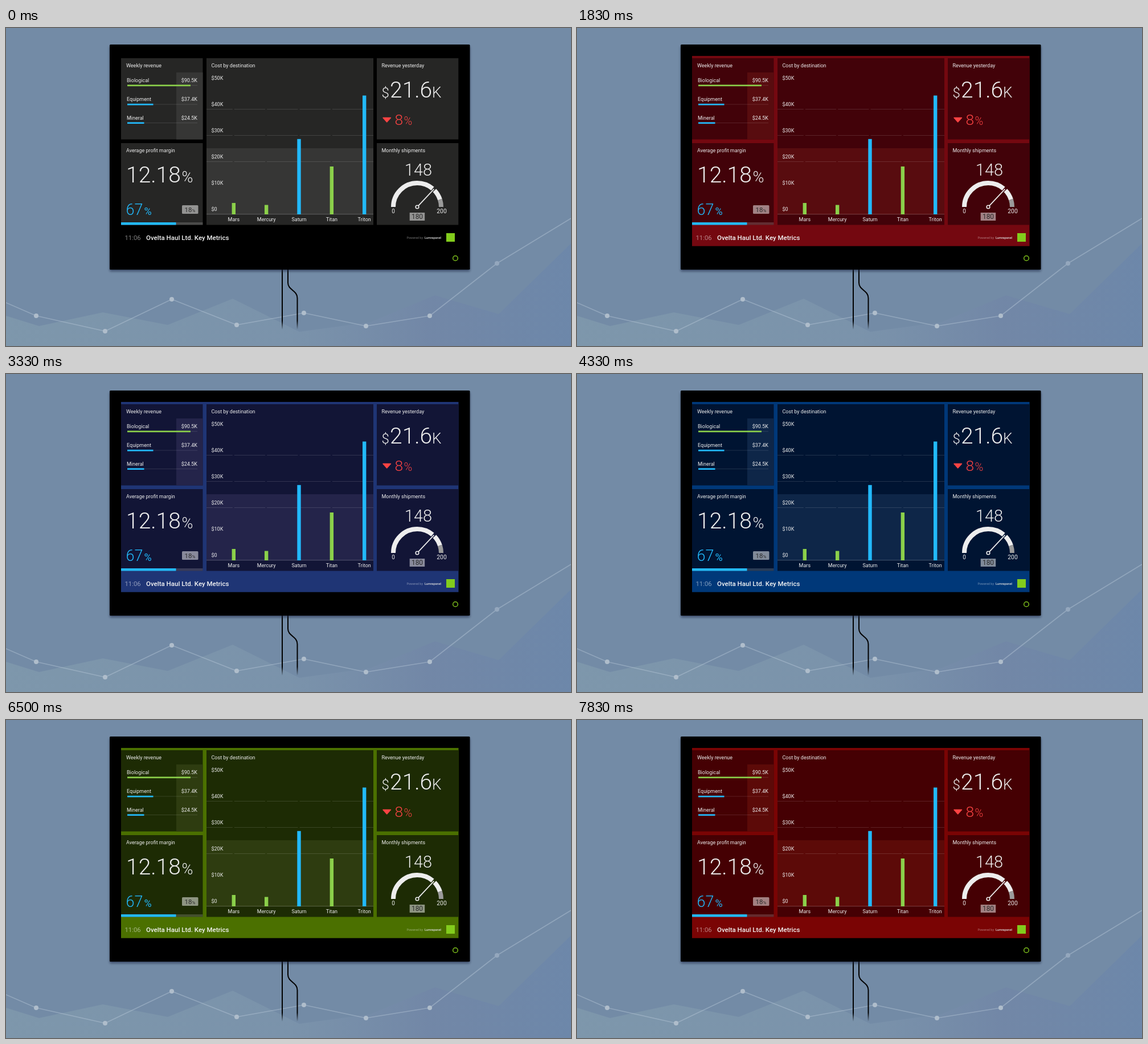
An HTML page with a canvas that plays this animation: 992x558 px, repeating every 8 s.

```html
<!DOCTYPE html>
<html lang="en">
<head>
<meta charset="utf-8">
<title>Wall dashboard</title>
<style>
html, body { margin: 0; width: 100%; height: 100%; overflow: hidden; background: #738ba6; }
canvas { display: block; }
</style>
</head>
<body>
<canvas id="stage" width="992" height="558"></canvas>
<script>
const ctx = document.getElementById('stage').getContext('2d');
const FONT = 'Roboto, Arial, sans-serif';
const LOOP = 8000, FPS = 6, LAST = 47;
const GREEN = '#8bd04a', BLUE = '#22b9fb', RED = '#fa4343', INK = '#ededed';

// Theme colours: screen, tile, highlighted band
const THEMES = {
  black:  ['000000', '262625', '363635'],
  red:    ['7a0404', '450003', '5c0a08'],
  purple: ['3e2878', '24103f', '3a1c50'],
  teal:   ['004272', '001a2c', '0e2c44'],
  blue:   ['00367a', '001333', '0e2549'],
  navy:   ['00297a', '000d38', '0e1c50'],
  green:  ['207000', '0c2b04', '1d3c10'],
  olive:  ['627000', '262b04', '373c10']
};

// Each change: first step, last step, theme reached
const CHANGES = [
  [0, 6, 'red'], [10, 15, 'purple'], [19, 21, 'teal'], [23, 27, 'blue'],
  [30, 31, 'navy'], [32, 35, 'green'], [36, 41, 'olive'], [43, 47, 'red']
];

const rgb = hex => [0, 2, 4].map(i => parseInt(hex.slice(i, i + 2), 16));
const ease = p => p * p * (3 - 2 * p);

function mix(a, b, p) {
  const from = rgb(a), to = rgb(b);
  return `rgb(${from.map((v, i) => Math.round(v + (to[i] - v) * p)).join(',')})`;
}

function themeAt(time) {
  const step = Math.min(LAST, Math.floor((time + 7) * FPS / 1000));
  let from = 'black', to = 'black', p = 0;
  for (const [start, end, name] of CHANGES) {
    if (step < start) break;
    from = to;
    to = name;
    p = ease(Math.min(1, (step - start) / (end - start)));
  }
  return THEMES[from].map((c, i) => mix(c, THEMES[to][i], p));
}

function rect(x1, y1, x2, y2, color) {
  ctx.fillStyle = color;
  ctx.fillRect(x1, y1, x2 - x1, y2 - y1);
}

function text(str, x, y, size, { color = INK, align = 'left', weight = 400 } = {}) {
  ctx.font = `${weight} ${size}px ${FONT}`;
  ctx.textAlign = align;
  ctx.fillStyle = color;
  ctx.fillText(str, x, y);
}

function trace(points) {
  ctx.beginPath();
  points.forEach(([x, y]) => ctx.lineTo(x, y));
}

function stroke(color, width) {
  ctx.strokeStyle = color;
  ctx.lineWidth = width;
  ctx.stroke();
}

function ring(x, y, r, color, width) {
  ctx.beginPath();
  ctx.arc(x, y, r, 0, Math.PI * 2);
  stroke(color, width);
}

function drawWall() {
  rect(0, 0, 992, 558, '#738ba6');
  const hill = ctx.createLinearGradient(0, 0, 992, 0);
  hill.addColorStop(0, 'rgba(150,178,184,.3)');
  hill.addColorStop(.5, 'rgba(140,165,182,.3)');
  hill.addColorStop(.75, 'rgba(112,128,168,.35)');
  hill.addColorStop(1, 'rgba(100,130,175,.4)');
  trace([[0, 505], [58, 523], [170, 499], [284, 521], [398, 475], [515, 533],
    [640, 516], [753, 469], [865, 502], [992, 378], [992, 558], [0, 558]]);
  ctx.fillStyle = hill;
  ctx.fill();

  const line = [[0, 482], [53, 505], [174, 532], [291, 476], [405, 521], [523, 500],
    [632, 523], [744, 505], [862, 413], [992, 334]];
  trace(line);
  stroke('rgba(190,205,220,.4)', 1.6);
  for (const [x, y] of line.slice(1, -1)) {
    ctx.beginPath();
    ctx.arc(x, y, 4, 0, Math.PI * 2);
    ctx.fillStyle = x > 800 ? '#94a7bd' : '#afbdcb';
    ctx.fill();
  }
}

function drawTelevision() {
  const cable = ctx.createLinearGradient(0, 427, 0, 529);
  cable.addColorStop(0, '#000');
  cable.addColorStop(.85, '#000');
  cable.addColorStop(1, 'rgba(0,0,0,0)');
  trace([[485, 424], [485, 529]]);
  stroke(cable, 2);
  ctx.beginPath();
  ctx.moveTo(495, 424);
  ctx.lineTo(495, 447);
  ctx.bezierCurveTo(495, 460, 511.5, 460, 511.5, 474);
  ctx.lineTo(511.5, 529);
  stroke(cable, 2);

  ctx.save();
  ctx.shadowColor = 'rgba(25,35,65,.6)';
  ctx.shadowBlur = 4;
  ctx.shadowOffsetY = 3;
  ctx.beginPath();
  ctx.roundRect(182, 29, 632.5, 395, 1.5);
  ctx.fillStyle = '#000';
  ctx.fill();
  ctx.restore();
  ring(789, 404, 4.3, '#7cbc1c', 1.5);
}

function drawRevenue(band) {
  rect(299, 78, 345.5, 195.5, band);
  text('Weekly revenue', 211, 69, 9);
  const rows = [
    ['Biological', '$90.5K', 95, 324, GREEN],
    ['Equipment', '$37.4K', 128.3, 258.5, BLUE],
    ['Mineral', '$24.5K', 160.8, 242.5, BLUE]
  ];
  for (const [name, value, y, end, color] of rows) {
    text(name, 212, y, 9);
    text(value, 336, y, 9, { align: 'right' });
    rect(213, y + 5.2, 336, y + 6.2, 'rgba(255,255,255,.12)');
    rect(213, y + 4.5, end, y + 7.2, color);
  }
}

function drawMargin() {
  text('Average profit margin', 211, 218, 9);
  text('12.18', 211, 270.5, 39, { weight: 300 });
  text('%', 308.5, 270.5, 27, { weight: 300 });
  text('67', 210.5, 328, 27, { color: BLUE, weight: 300 });
  text('%', 242.5, 328, 18, { color: BLUE });
  ctx.beginPath();
  ctx.roundRect(309, 311, 28.5, 15, 1.5);
  ctx.fillStyle = 'rgba(255,255,255,.5)';
  ctx.fill();
  text('18', 313.5, 323, 11.5, { color: '#2b2b2b' });
  text('%', 326.5, 323, 8, { color: '#2b2b2b' });
  rect(202, 341, 345.5, 345.5, 'rgba(255,255,255,.17)');
  rect(202, 341, 298.5, 345.5, BLUE);
}

function drawCosts(band) {
  rect(352, 211, 645, 327, band);
  text('Cost by destination', 360.5, 69, 9);
  const bars = [
    ['Mars', 307, GREEN], ['Mercury', 310.5, GREEN], ['Saturn', 194.8, BLUE],
    ['Titan', 243, GREEN], ['Triton', 118.5, BLUE]
  ];
  const center = i => 399.8 + i * 57.35;
  for (const y of [142, 188, 234]) {
    for (let i = 0; i <= bars.length; i++) {
      const x1 = i ? center(i - 1) + 1 : 352;
      const x2 = i < bars.length ? center(i) - 2 : 645;
      rect(x1, y, x2, y + 1, 'rgba(255,255,255,.13)');
    }
  }
  rect(352, 326.3, 645, 327.3, 'rgba(255,255,255,.23)');
  for (let i = 0; i <= 5; i++) {
    text(i ? `$${i}0K` : '$0', 360.5, 321 - i * 46.1, 9);
  }
  bars.forEach(([name, top, color], i) => {
    const x = center(i);
    rect(x - 3.2, top, x + 3.2, 327, color);
    text(name, x, 339, 9, { align: 'center' });
  });
}

function drawYesterday() {
  text('Revenue yesterday', 659.5, 69, 9);
  text('$', 659.5, 121.5, 24, { weight: 300 });
  text('21.6', 674, 121.5, 39, { weight: 300 });
  text('K', 748, 121.5, 26, { weight: 300 });
  trace([[662, 157.5], [675.5, 157.5], [668.7, 165]]);
  ctx.closePath();
  ctx.lineJoin = 'round';
  ctx.fillStyle = RED;
  ctx.fill();
  stroke(RED, 1.4);
  text('8', 682.5, 170, 26.5, { color: RED, weight: 300 });
  text('%', 698.5, 170, 20, { color: RED, weight: 300 });
}

function drawGauge() {
  const cx = 722, cy = 314;
  const angle = value => Math.PI * (1 + value / 200);
  const arc = (from, to, color) => {
    ctx.beginPath();
    ctx.arc(cx, cy, 42, angle(from), angle(to));
    stroke(color, 8);
  };
  text('Monthly shipments', 659.5, 218, 9);
  text('148', 724, 258.5, 29, { align: 'center', weight: 300 });
  arc(0, 144.5, INK);
  arc(151.5, 180, INK);
  arc(180, 200, '#9b9b9b');
  const a = angle(148);
  trace([3, 43].map(r => [cx + r * Math.cos(a), cy + r * Math.sin(a)]));
  stroke(INK, 1.7);
  ring(cx, cy, 2.8, INK, 1.6);
  text('0', 680, 324.5, 10, { align: 'center' });
  text('200', 765, 324.5, 10.3, { align: 'center' });
  rect(708.7, 324, 735.2, 338, 'rgba(255,255,255,.5)');
  text('180', 722, 335.3, 12, { align: 'center', color: '#2b2b2b' });
}

function drawFooter() {
  text('11:06', 208.5, 372, 11.3, { color: 'rgba(255,255,255,.5)' });
  text('Ovelta Haul Ltd. Key Metrics', 246, 372, 11.5, { weight: 500, color: '#f4f4f4' });
  text('Powered by', 703.5, 370, 5.5, { color: 'rgba(255,255,255,.45)' });
  text('Lumrapanel', 764, 370, 5.5, { align: 'right', weight: 500, color: '#ddd' });
  rect(773, 360, 788, 375, '#82cc1c');
}

function draw(time) {
  const [screen, tile, band] = themeAt(time);
  drawWall();
  drawTelevision();
  rect(202, 49, 794.5, 382.7, screen);
  rect(202, 53, 345.5, 195.5, tile);
  rect(202, 202, 345.5, 345.5, tile);
  rect(352, 53, 645, 345.5, tile);
  rect(651, 53, 794.3, 195.5, tile);
  rect(651, 202, 794.3, 345.5, tile);
  drawRevenue(band);
  drawMargin();
  drawCosts(band);
  drawYesterday();
  drawGauge();
  drawFooter();
}

const begin = performance.now();
function tick() {
  draw((performance.now() - begin) % LOOP);
  requestAnimationFrame(tick);
}
tick();
</script>
</body>
</html>
```
